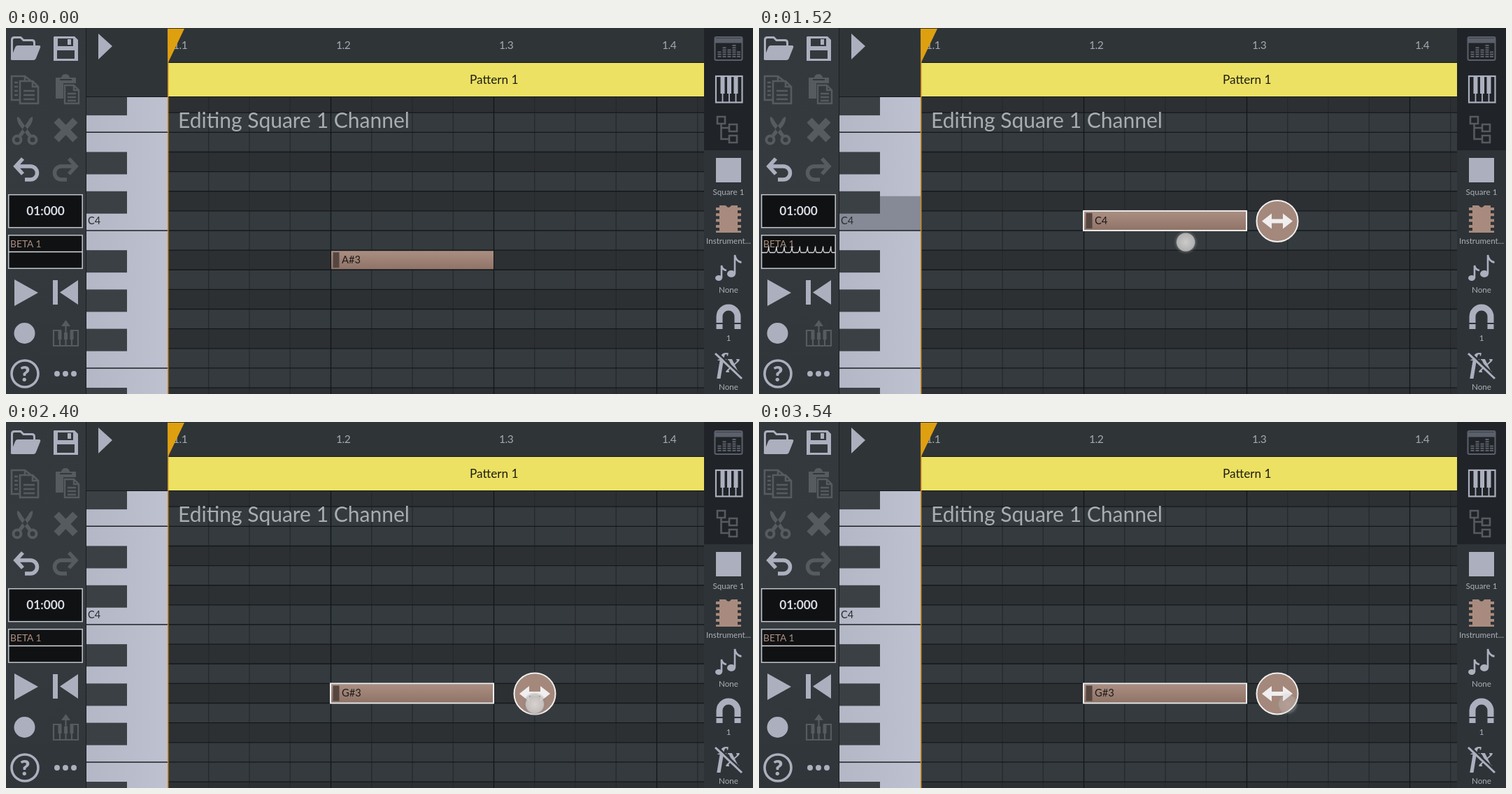
An HTML page that plays this animation: 1068x524 px, repeating every 3670 ms.

```html
<!DOCTYPE html>
<html lang="en">
<head>
<meta charset="utf-8">
<title>Piano roll</title>
<style>
  html, body { margin: 0; width: 100%; height: 100%; overflow: hidden; background: #2f3437; }
  svg { display: block; width: 100vw; height: 100vh; }
  text { font-family: Lato, "Open Sans", sans-serif; }
  .fill { fill: #abafbe; }
  .line { fill: none; stroke: #abafbe; }
  .dim .fill, .dim.fill { fill: #565b5f; }
  .dim .line, .dim.line { stroke: #565b5f; }
  .label { font-size: 11.6px; fill: #abafb8; text-anchor: middle; }
  .beat { font-size: 15.5px; letter-spacing: -.4px; fill: #a4a9b3; }
  .box { fill: #101112; stroke: #c3c6cf; stroke-width: 1.5; }
  .math { font: italic 700 40px "Liberation Serif", serif; text-anchor: middle; }
</style>
</head>
<body>
<svg viewBox="0 0 1068 524" preserveAspectRatio="none">
  <defs>
    <linearGradient id="ivory"><stop stop-color="#b3b7c6"/><stop offset="1" stop-color="#bec1cf"/></linearGradient>
    <linearGradient id="clay" x2="0" y2="1"><stop stop-color="#aa8e82"/><stop offset="1" stop-color="#907468"/></linearGradient>
    <linearGradient id="side" x2="0" y2="1"><stop stop-color="#33383c"/><stop offset=".5" stop-color="#363b3f"/><stop offset="1" stop-color="#303539"/></linearGradient>
    <radialGradient id="glow">
      <stop stop-color="#dddbda" stop-opacity=".9"/><stop offset=".72" stop-color="#c8c6c5" stop-opacity=".85"/>
      <stop offset=".8" stop-color="#888" stop-opacity=".35"/><stop offset="1" stop-color="#777" stop-opacity="0"/>
    </radialGradient>
    <clipPath id="roll"><path d="M232 98H998V524H232z"/></clipPath>
    <path id="bend" d="M24 187L14 198L24 209M14 198H35A9.5 9.5 0 0 1 35 217H27"/>
    <path id="quaver" d="M0 0V-18Q1 -12 7 -11"/>
  </defs>

  <rect width="1068" height="524" fill="#2f3437"/>
  <g id="grid" clip-path="url(#roll)"></g>
  <text x="246" y="143" font-size="30" fill="#a9adb2">Editing Square 1 Channel</text>

  <g clip-path="url(#roll)">
    <g id="note">
      <rect id="bar" x="465" y="-13" height="26" fill="url(#clay)"/>
      <rect x="467.5" y="-11" width="9" height="22" fill="#554640"/>
      <text id="pitch" x="480" y="5" font-size="14.7" fill="#1d1a19"></text>
      <rect id="frame" x="464" y="-14" height="28" fill="none" stroke="#f0eeed" stroke-width="2"/>
    </g>
    <g id="handle">
      <circle r="29.5" fill="#a4887c" stroke="#f0eeed" stroke-width="2"/>
      <path d="M-22 0L-8-11V-3H8V-11L22 0L8 11V3H-8V11z" fill="#f0eeee"/>
    </g>
  </g>

  <path d="M232 50H998V98H232z" fill="#ece163"/>
  <text x="663" y="80" font-size="17.2" fill="#1e1d12">Pattern 1</text>
  <path d="M115 98.5H998M232 49.5H998" stroke="#16191b"/>
  <g id="beats" class="beat"></g>
  <g id="keys"></g>
  <text x="117" y="281" font-size="14.5" fill="#2b2d31">C4</text>
  <path d="M231.7 2V524" stroke="#c98a20" stroke-width="1.5"/>
  <path d="M231 1H255L232 49z" fill="#dfa010"/>
  <path class="fill" d="M132 8L152 26L132 45z"/>

  <!-- left toolbar -->
  <rect width="114" height="524" fill="url(#side)"/>
  <path d="M114.5 0V524" stroke="#1b1e20"/>
  <path class="line" d="M8.5 43V17Q8.5 13.5 12 13.5H21L25 17.5H37Q40.5 17.5 40.5 21V25" stroke-width="3"/>
  <path class="fill" d="M17 25H47Q50 25 49 28L43 43Q42 46 39 46H9Q6 46 7 43L13 28Q14 25 17 25z"/>
  <path class="fill" fill-rule="evenodd" d="M69 12H98L103 17V47H68V13zM74 15V26H96V15zM73 32V44H98V32z"/>
  <path class="fill" d="M88 16H93V24H88z"/>
  <g class="dim">
    <path class="line" d="M20 103H8V69H27L36 76M27 69V76M20 76H38L46 84V108H20zM38 76V84H46M25 90H41M25 96H41M25 102H41M12 78H17M12 84H17M12 90H17M12 96H17" stroke-width="2.6"/>
    <path class="fill" d="M71 71H79Q80 66 85 66Q90 66 91 71H100V79H82V101H71z"/>
    <path d="M77 74H94" stroke="#33383c" stroke-width="2"/>
    <path class="line" d="M84 82H97L104 89V108H84zM97 82V89H104M88 94H100M88 99H100M88 104H100" stroke-width="2.4"/>
    <g class="line" stroke-width="4"><circle cx="16" cy="160" r="5.5"/><circle cx="38" cy="160" r="5.5"/></g>
    <path class="fill" d="M16 127Q20 128 22 133L37 154L32 156L19 139Q15 132 16 127zM38 127Q34 128 32 133L17 154L22 156L35 139Q39 132 38 127z"/>
    <path class="line" d="M72 132L99 160M99 132L72 160" stroke-width="10"/>
  </g>
  <use href="#bend" class="line" stroke-width="5.5"/>
  <use href="#bend" class="line dim" stroke-width="5.5" transform="matrix(-1 0 0 1 114 0)"/>

  <rect class="box" x="3.7" y="238.7" width="105.5" height="47"/>
  <text x="56.5" y="268" font-size="17.3" font-weight="700" text-anchor="middle" fill="#d9dce5">01:000</text>
  <rect class="box" x="3.7" y="296.7" width="105.5" height="47.5"/>
  <text x="6" y="314" font-size="13.8" fill="#ac9083">BETA 1</text>
  <path id="scope" fill="none" stroke="#d8dae0" stroke-width="1.3"/>

  <path class="fill" d="M12 360L46 379L12 398z"/>
  <path class="fill" d="M67 361H74V396H67zM103 361V396L77 378.5z"/>
  <circle class="fill" cx="26.5" cy="437" r="15"/>
  <g class="dim">
    <path class="line" d="M68 433H79M92 433H103V455H68V432M85.5 436V424M77 446V455M85.5 446V455M94 446V455" stroke-width="2.2"/>
    <path class="fill" d="M85.5 418L92 427H79z"/>
    <path class="line" d="M77 433V446M85.5 436V446M94 433V446" stroke-width="5"/>
  </g>
  <circle class="line" cx="27" cy="495" r="19" stroke-width="3.6"/>
  <text class="fill" x="27" y="506" font-size="31" font-weight="900" text-anchor="middle">?</text>
  <path class="line" d="M73 495H98" stroke-width="8" stroke-linecap="round" stroke-dasharray="0 12"/>

  <!-- right toolbar -->
  <path d="M998 0H1068V175H998z" fill="#202327"/>
  <path d="M998 175H1068V524H998z" fill="#2e3337"/>
  <g stroke="#5b606b" fill="none">
    <rect x="1013.5" y="13" width="39" height="33" rx="2" stroke-width="2"/>
    <path d="M1014 18H1052" stroke-width="7"/>
    <path d="M1020 42V33M1027 42V26M1034 42V30M1041 42V24M1047.5 42V33" stroke-width="5" stroke-dasharray="2 1.2"/>
  </g>
  <rect class="line" x="1015" y="69" width="37.5" height="37.5" stroke-width="2.2"/>
  <path class="line" d="M1024.5 93V106M1034 93V106M1043.5 93V106" stroke-width="1.8"/>
  <path class="line" d="M1024.5 70V94M1034 70V94M1043.5 70V94" stroke-width="6"/>
  <path class="line dim" d="M1017 127H1028V137H1017zM1034 138H1045V148H1034zM1034 154H1045V164H1034zM1022.5 137V159H1034M1022.5 143H1034" stroke-width="2.6"/>
  <path class="fill" d="M1015 186H1051V221H1015z"/>
  <path d="M1020 254H1029Q1033 260 1037 254H1046V293H1020z" fill="#a88b7e"/>
  <path d="M1017.5 257V293M1048.5 257V293" stroke="#a88b7e" stroke-width="5" stroke-dasharray="4 4.3"/>
  <g class="fill"><ellipse cx="1019" cy="358" rx="5" ry="4"/><ellipse cx="1037" cy="352" rx="6" ry="5"/></g>
  <g class="line" stroke-width="2.6">
    <use href="#quaver" x="1023" y="358"/>
    <use href="#quaver" transform="translate(1042 352) scale(1.35 1.5)" stroke-width="1.9"/>
  </g>
  <path class="line" d="M1020 431V413A13 13 0 0 1 1046 413V431" stroke-width="9"/>
  <path d="M1014 423H1025M1041 423H1052" stroke="#2e3337" stroke-width="2"/>
  <text class="fill math" x="1033" y="493">fx</text>
  <path d="M1016 464L1054 500" stroke="#2e3337" stroke-width="2.5"/>
  <path class="line" d="M1014 466L1052 502" stroke-width="3"/>
  <g id="labels" class="label"></g>
  <circle id="finger" r="17.5" fill="url(#glow)"/>
</svg>
<script>
const LOOP = 3670, TICK = 200 / 3;
const ROW = 28.13, WHITE = 49.25, C4 = 290;
const BEAT = 233, LEFT = 231.5;
const NAMES = ['C4', 'B3', 'A#3', 'A3', 'G#3'];

const $ = id => document.getElementById(id);
const set = (el, attrs) => { for (const k in attrs) el.setAttribute(k, attrs[k]); return el; };
const add = (parent, tag, attrs) =>
  parent.appendChild(set(document.createElementNS('http://www.w3.org/2000/svg', tag), attrs));
const rect = (parent, x, y, width, height, fill) => add(parent, 'rect', { x, y, width, height, fill });
const show = (el, on) => set(el, { visibility: on ? 'visible' : 'hidden' });

// Row 0 is C4; rows count downwards.
const rowTop = r => C4 + (r - 1) * ROW;
const isBlack = r => [1, 3, 6, 8, 10].includes((12 - r) % 12);

const grid = $('grid'), keys = $('keys'), lit = {};
for (let r = -6; r < 10; r++) rect(grid, 232, rowTop(r), 766, ROW, isBlack(r) ? '#2c3033' : '#343a3e');
for (let i = 1; i < 14; i++) {
  const x = LEFT + i * BEAT / 4;
  add(grid, 'path', { d: `M${x} 98V524`, stroke: i % 4 ? '#25292c' : '#121416', 'stroke-width': 1.2 });
}
for (let r = -5; r < 10; r++)
  add(grid, 'path', { d: `M232 ${rowTop(r)}H998`, stroke: '#15181a', 'stroke-width': 1.3 });

rect(keys, 115, 99, 116, 425, 'url(#ivory)');
['C4', 'B3', 'A3'].forEach((name, i) => {
  lit[name] = rect(keys, 115, C4 + (i - 1) * WHITE, 116, WHITE, '#868a96');
});
for (const r of [-4, 1, 8])
  add(keys, 'path', { d: `M115 ${rowTop(r)}H231`, stroke: '#1d1f22', 'stroke-width': 1.5 });
for (let r = -6; r < 10; r++) {
  if (!isBlack(r)) continue;
  const y = Math.max(99, rowTop(r)), h = rowTop(r) + 32 - y;
  rect(keys, 115, y, 58, h, '#3b4044');
  if (NAMES[r]) lit[NAMES[r]] = rect(keys, 115, y, 58, h, '#66686b');
}

for (let i = 0; i < 4; i++)
  add($('beats'), 'text', { x: 239 + i * BEAT, y: 30 }).textContent = `1.${i + 1}`;
['Square 1', 'Instrument...', 'None', '1', 'None'].forEach((label, i) => {
  add($('labels'), 'text', { x: 1033, y: 239 + i * 69.8 }).textContent = label;
});

const FLAT = 'M4 320.5H109';
let pulses = 'M4 321.5';
for (let x = 14; x < 108; x += 11.1) pulses += `H${x - 3}Q${x - 1} 321 ${x} 312.5Q${x} 321 ${x + 2} 321.5`;
pulses += 'H109';

const part = (t, from, to) => Math.min(1, Math.max(0, (t - from) / (to - from)));
const ease = (t, from, to) => { const p = part(t, from, to); return p * p * (3 - 2 * p); };
const easeOut = (t, from, to) => 1 - (1 - part(t, from, to)) ** 2;

// Three touches: select the note, move it up and down, pull its handle out and back.
const tap = { from: 200, to: 533, x: () => 585, y: () => 335 };
const move = {
  from: 1000, to: 2050,
  x: t => 598 + 19 * ease(t, 1200, 1650),
  y: t => 334 - 70 * ease(t, 1000, 1250) + 120 * ease(t, 1350, 1640)
};
const pull = {
  from: 2400, to: 3480,
  x: t => 756 + 206 * (ease(t, 2480, 2720) - easeOut(t, 2760, 3400)),
  y: () => 404
};
const FADE = 110;
const held = (g, t) => t >= g.from - 1 && t < g.to;
const rowAt = t => Math.floor((move.y(t) - C4) / ROW) + 1;

function draw(now) {
  // The screen refreshes in ticks and the app trails the finger by one.
  const t = Math.floor((now + 11) / TICK) * TICK, late = t - TICK;
  const row = rowAt(late), y = rowTop(row) + ROW / 2;
  const pulling = held(pull, t), grip = pull.x(late);
  const end = LEFT + BEAT * (pulling && grip > LEFT + 3 * BEAT ? 3 : 2);
  const picked = t > 330;

  set($('note'), { transform: `translate(0 ${y})` });
  set($('bar'), { width: end - 465.5 });
  show(set($('frame'), { width: end - 464.5 }), picked);
  $('pitch').textContent = NAMES[row];
  show(set($('handle'), { transform: `translate(${pulling ? grip : end + 43.5} ${y + .5})` }), picked);

  const touch = [tap, move, pull].find(g => t >= g.from - 1 && t < g.to + FADE);
  show($('finger'), touch);
  if (touch) {
    const opacity = t < touch.to ? 1 : .6 * (1 - (t - touch.to) / FADE);
    set($('finger'), { cx: touch.x(t), cy: touch.y(t), opacity });
  }

  const playing = held(move, t) && t > 1100;
  const sounding = [row, rowAt(t - 1.5 * TICK)].map(r => NAMES[r]);
  for (const name in lit) show(lit[name], playing && sounding.includes(name));
  set($('scope'), { d: playing && t > 1300 ? pulses : FLAT });
}

const start = performance.now();
function tick() {
  draw((performance.now() - start) % LOOP);
  requestAnimationFrame(tick);
}
tick();
</script>
</body>
</html>
```
